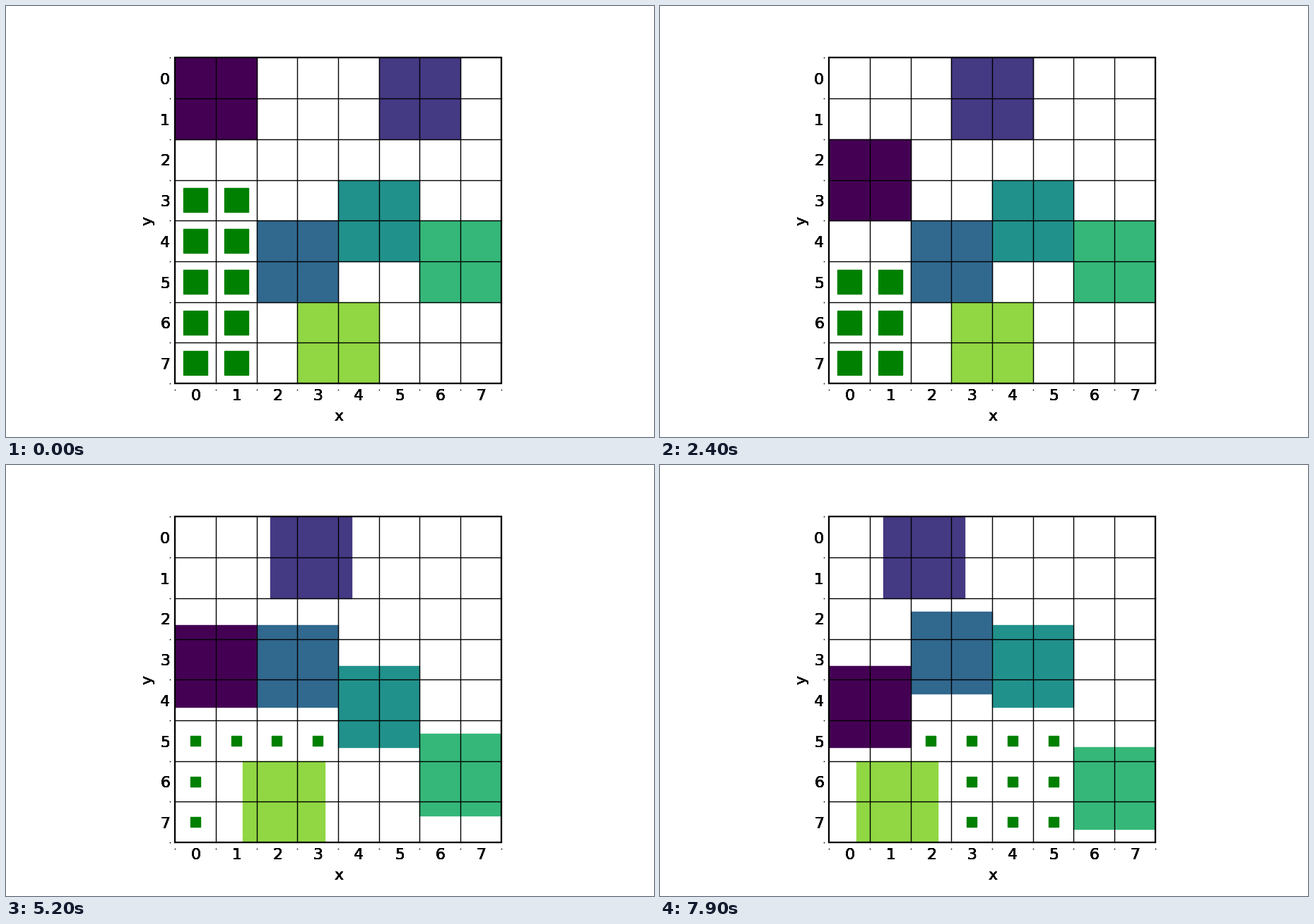
Recreate the animation shown at these times as a matplotlib script. Size 917x611 px, loop 8000 ms.

```python
import matplotlib.pyplot as plt
import numpy as np
from matplotlib.animation import FuncAnimation
from matplotlib.patches import Rectangle

W, H, DPI = 917, 611, 64
PX = 72 / DPI  # points per pixel
N, CELL = 8, 57.72
LEFT, TOP = 239.08, 73.4
SIDE = N * CELL
LINE = 1.39 * PX
SUB = 3  # frames per cell of motion
FRAMES = 80

# axis of motion, lane, lowest and highest position, phase
BLOCKS = [
    ("y", 0, 0, 5, 0),
    ("x", 0, 1, 6, 4),
    ("y", 2, 2, 4, 2),
    ("y", 4, 2, 4, 1),
    ("y", 6, 2, 6, 2),
    ("x", 6, 0, 4, 5),
]

# first step at which the walker passes through a cell (x, y)
ROUTE = {
    0: (0, 7), 1: (0, 5), 3: (4, 6), 5: (5, 6), 6: (6, 6), 7: (0, 6),
    9: (0, 5), 13: (0, 7), 18: (0, 5), 23: (6, 6), 24: (6, 7), 25: (5, 6),
}


def place(block, t):
    """Top left cell of a block bouncing along its lane."""
    axis, lane, lo, hi, phase = block
    span = hi - lo
    pos = hi - abs((t + phase) % (2 * span) - span)
    return (lane, pos) if axis == "y" else (pos, lane)


def free_cells(step):
    """Cells that no block touches between step and step + 1."""
    free = np.ones((N, N), bool)
    for block in BLOCKS:
        for t in (step, step + 1):
            x, y = place(block, t)
            free[x:x + 2, y:y + 2] = False
    return free


def flood(free, seed):
    found, todo = {seed}, [seed]
    while todo:
        x, y = todo.pop()
        for c in ((x + 1, y), (x - 1, y), (x, y + 1), (x, y - 1)):
            if c not in found and 0 <= min(c) and max(c) < N and free[c]:
                found.add(c)
                todo.append(c)
    return sorted(found)


def safe_region(frame):
    step, part = divmod(frame, SUB)
    seed = ROUTE[max(s for s in ROUTE if s <= step)]
    free = free_cells(step)
    if part == 0:
        free &= free_cells(step - 1)
    return flood(free, seed)


def to_px(x, y):
    return LEFT + x * CELL, TOP + y * CELL


fig = plt.figure(figsize=(W / DPI, H / DPI), dpi=DPI, facecolor="white")
ax = fig.add_axes([0, 0, 1, 1])
ax.set(xlim=(0, W), ylim=(H, 0))
ax.axis("off")


def label(x, y, text, **style):
    """Text painted repeatedly, which hardens its soft edges."""
    for _ in range(10):
        ax.text(x, y, text, family="DejaVu Sans", size=22 * PX, color="black",
                va="baseline", **style)


board = Rectangle((LEFT, TOP), SIDE, SIDE, fc="none", ec="black",
                  lw=2.3 * PX, zorder=5)
ax.add_patch(board)

for i in range(N + 1):
    gx, gy = to_px(i, i)
    if 0 < i < N:
        ax.plot([gx, gx], [TOP, TOP + SIDE], color="black", lw=LINE, zorder=3)
        ax.plot([LEFT, LEFT + SIDE], [gy, gy], color="black", lw=LINE, zorder=3)
    ax.plot([gx, LEFT - 7.5], [TOP + SIDE + 8.5, gy], "s", color="black",
            ms=1.5 * PX, mew=0)

for i in range(N):
    cx, cy = to_px(i + 0.5, i + 0.5)
    label(cx + 0.5, 559, str(i), ha="center")
    label(232, cy + 8.7, str(i), ha="right")
label(470.5, 588.5, "x", ha="center")
label(206.5, 304.5, "y", ha="center", rotation=90, rotation_mode="anchor")

tiles = []
for k in range(len(BLOCKS)):
    color = plt.cm.viridis(k / len(BLOCKS))
    tile = Rectangle((0, 0), 2 * CELL, 2 * CELL, fc=color, ec=color,
                     lw=LINE, zorder=2)
    ax.add_patch(tile)
    tile.set_clip_path(board)
    tiles.append(tile)

dots, = ax.plot([], [], "s", color="green", mew=LINE, zorder=4)


def draw(frame):
    for tile, block in zip(tiles, BLOCKS):
        tile.set_xy(to_px(*place(block, frame / SUB)))
    xs, ys = np.array(safe_region(frame)).T + 0.5
    dots.set_data(*to_px(xs, ys))
    dots.set_markersize((13.9 if frame % SUB else 33.3) * PX)
    return [*tiles, dots]


anim = FuncAnimation(fig, draw, frames=FRAMES, interval=100, repeat=True,
                     repeat_delay=0, blit=False)
plt.show()
```
